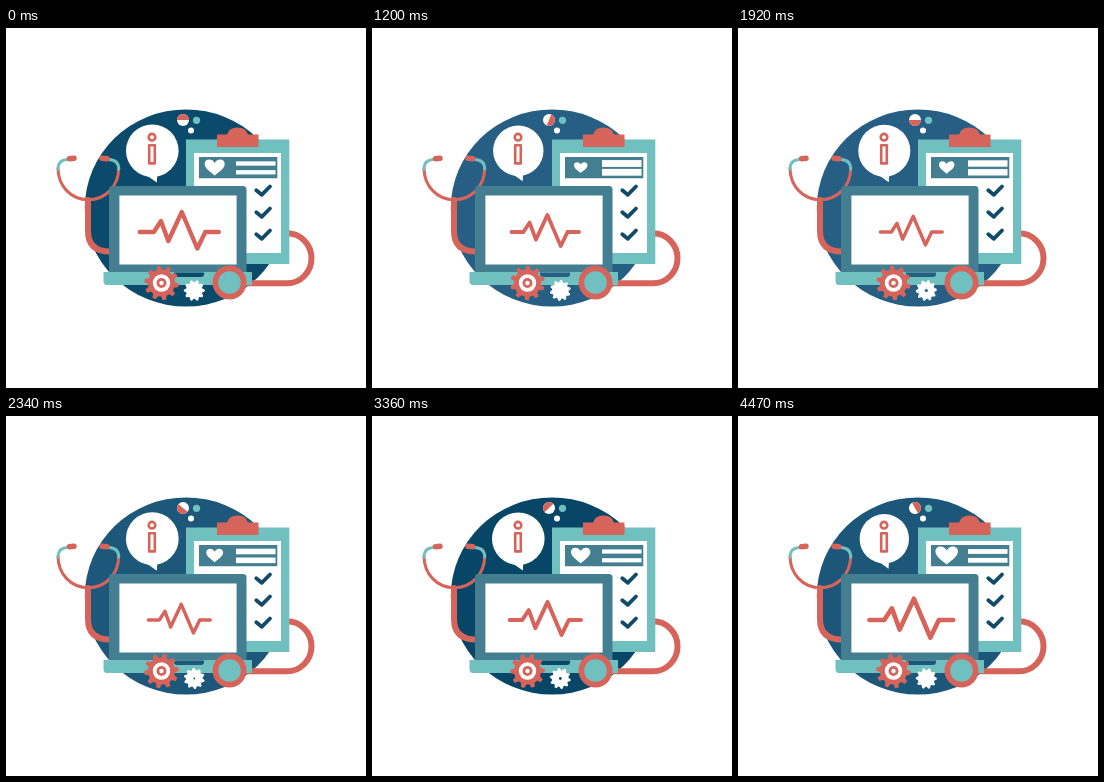
Animation, 360 px wide and 360 px high, one loop 4.5 s. Source, as an HTML page:

```html
<!DOCTYPE html>
<html>
<head>
<meta charset="utf-8">
<style>
html, body { margin: 0; width: 100%; height: 100%; overflow: hidden; background: #fff; }
svg { display: block; width: 100vw; height: 100vh; }
.line { fill: none; stroke: #d7645b; stroke-linecap: round; stroke-linejoin: round; }
.red { fill: #d7645b; }
.teal { fill: #71c0c0; }
.slate { fill: #437f91; }
.white { fill: #fff; }
</style>
</head>
<body>
<svg viewBox="0 0 360 360">
  <ellipse id="disc" cx="180" cy="180" rx="101.2" ry="98.6"/>

  <g id="bubble" class="white">
    <circle r="26"/>
    <path d="M-9 22L4.5 31.5L5 22Z"/>
  </g>
  <g class="line" stroke-width="2.6">
    <circle cx="146" cy="109.2" r="3.3"/>
    <rect x="143.2" y="117.2" width="5.6" height="18.2"/>
  </g>

  <g id="pill">
    <circle r="6" class="white"/>
    <path class="red" d="M0 -6A6 6 0 0 1 0 6Z"/>
  </g>
  <circle cx="190.5" cy="92.3" r="3.6" class="teal"/>
  <circle cx="185" cy="102.5" r="3" class="white"/>

  <path class="line" stroke-width="6" d="M281 205.3A24.5 25 0 0 1 281 255.3H237"/>

  <path class="teal" d="M180 111.5H283.3V236H180Z"/>
  <path class="white" d="M188 125H275V225H188Z"/>
  <path class="red" d="M211 119V106.5H221Q223 99.5 231.5 99.5Q240 99.5 242 106.5H252.5V119Z"/>
  <path class="slate" d="M193 129H271.3V150.2H193Z"/>
  <path id="heart" class="white" d="M0 8C-4 4.5 -10 1 -10 -3.5C-10 -9 -2.5 -9.5 0 -4.5C2.5 -9.5 10 -9 10 -3.5C10 1 4 4.5 0 8Z"/>
  <rect id="bar1" class="white" x="230" width="39.5"/>
  <rect id="bar2" class="white" x="230" width="39.5"/>
  <g id="checks" fill="none" stroke="#124b6a" stroke-width="3.8" stroke-linecap="round" stroke-linejoin="round"></g>

  <g class="line">
    <path d="M82 172V203Q82 223.5 104 223.5" stroke-width="6"/>
    <path d="M52 140C52 158 65 171.7 82.3 171.7S112.7 158 112.7 140" stroke-width="3"/>
    <path d="M61 131.5Q52 132 52 141M103 131.5Q112.7 132 112.7 141" style="stroke:#71c0c0" stroke-width="3"/>
    <path d="M63.5 130.8L68 130.3M101 130.8L96 130.3" stroke-width="5.5"/>
  </g>

  <path class="slate" d="M106 158H237Q240.5 158 240.5 161.5V244H103V161Q103 158 106 158Z"/>
  <path class="white" d="M113.4 167.4H230.6V236.4H113.4Z"/>
  <path class="teal" d="M97.5 244H246V257H101Q97.5 257 97.5 253Z"/>
  <path id="notch" d="M168 244.5H198V246Q198 249 195 249H171Q168 249 168 246Z"/>

  <path id="pulse" class="line" stroke-width="4.4" d="M-39.5 0H-25.5L-18.3 -11L-11 9L2.5 -20L18 16.5L26 0H39.5"/>

  <path id="gearA" class="red"/>
  <circle cx="155.5" cy="255" r="8.7" class="white"/>
  <circle cx="155.5" cy="255" r="3.6" class="line" stroke-width="2.8"/>
  <path id="gearB" class="white"/>
  <circle id="hole" cx="188.3" cy="262.5"/>

  <circle cx="223.5" cy="254.5" r="17" class="red"/>
  <circle cx="223.5" cy="254.5" r="11.3" class="teal"/>
</svg>
<script>
const LOOP = 4500;
const TIMES = [0, 750, 1200, 1920, 2730, 3360, 4470];
const PULSE = [83, 75, 71, 65, 67, 75, 88];
const BUBBLE = [26.3, 24.6, 25.2, 26, 26.6, 26.3, 24.7];
const HEART = [20, 16, 13.5, 15.5, 18, 19.5, 22.5];
const BAR = [4.3, 6, 6.8, 6.4, 4.8, 4.2, 4.8];
const SHADE = [0.2, 0.75, 1, 1, 0.4, 0.05, 0.7];
const HOLE = [0, 0, 0, 1.5, 0.4, 1.4, 0];
const DARK = [6, 69, 101], LIGHT = [38, 95, 131];

const $ = id => document.getElementById(id);
const set = (id, attrs) => {
  for (const k in attrs) $(id).setAttribute(k, attrs[k]);
};

function slope(v, i) {
  const a = Math.max(i - 1, 0), b = Math.min(i + 1, v.length - 1);
  return (v[b] - v[a]) / (TIMES[b] - TIMES[a]);
}

// Smooth cubic curve through the key values
function curve(v, t) {
  let i = 0;
  while (i < TIMES.length - 2 && t > TIMES[i + 1]) i++;
  const d = TIMES[i + 1] - TIMES[i], u = Math.min((t - TIMES[i]) / d, 1);
  const w = 1 - u;
  return v[i] * (1 + 2 * u) * w * w + v[i + 1] * u * u * (3 - 2 * u)
    + d * u * w * (slope(v, i) * w - slope(v, i + 1) * u);
}

function gear(teeth, outer, inner, base, tip) {
  const step = 2 * Math.PI / teeth, pts = [];
  for (let i = 0; i < teeth; i++) {
    for (const [f, r] of [[-base, inner], [-tip, outer], [tip, outer], [base, inner]]) {
      const a = (i + f) * step;
      pts.push((r * Math.cos(a)).toFixed(2) + " " + (r * Math.sin(a)).toFixed(2));
    }
  }
  return "M" + pts.join("L") + "Z";
}

$("checks").innerHTML = [162, 184, 206].map(y =>
  `<path d="M250.3 ${y + 0.3}L255.7 ${y + 4.8}L264 ${y - 3.5}"/>`).join("");
set("gearA", { d: gear(10, 17.3, 13.6, 0.31, 0.17) });
set("gearB", { d: gear(10, 10.5, 8.3, 0.4, 0.12) });

function draw(t) {
  const shade = curve(SHADE, t);
  const fill = `rgb(${DARK.map((c, i) => Math.round(c + (LIGHT[i] - c) * shade))})`;
  for (const id of ["disc", "notch", "hole"]) set(id, { fill });

  set("bubble", { transform: `translate(146.3 122.7) scale(${curve(BUBBLE, t) / 26})` });
  set("pulse", { transform: `translate(173.3 204) scale(${curve(PULSE, t) / 83})` });
  set("heart", { transform: `translate(208.7 139.5) scale(${curve(HEART, t) / 20})` });

  const h = curve(BAR, t);
  set("bar1", { y: 135.5 - h / 2, height: h });
  set("bar2", { y: 144.3 - h / 2, height: h });

  set("pill", { transform: `translate(177 92) rotate(${-90 + t * 0.094})` });
  set("gearA", { transform: `translate(155.5 255) rotate(${8 + t * 0.04})` });
  set("gearB", { transform: `translate(188.3 262.5) rotate(${-t * 0.04})` });
  set("hole", { r: Math.max(0, curve(HOLE, t)) });
}

const start = performance.now();
function tick() {
  const t = (performance.now() - start) % LOOP;
  draw(Math.floor(t / 30) * 30);
  requestAnimationFrame(tick);
}
draw(0);
requestAnimationFrame(tick);
</script>
</body>
</html>
```
